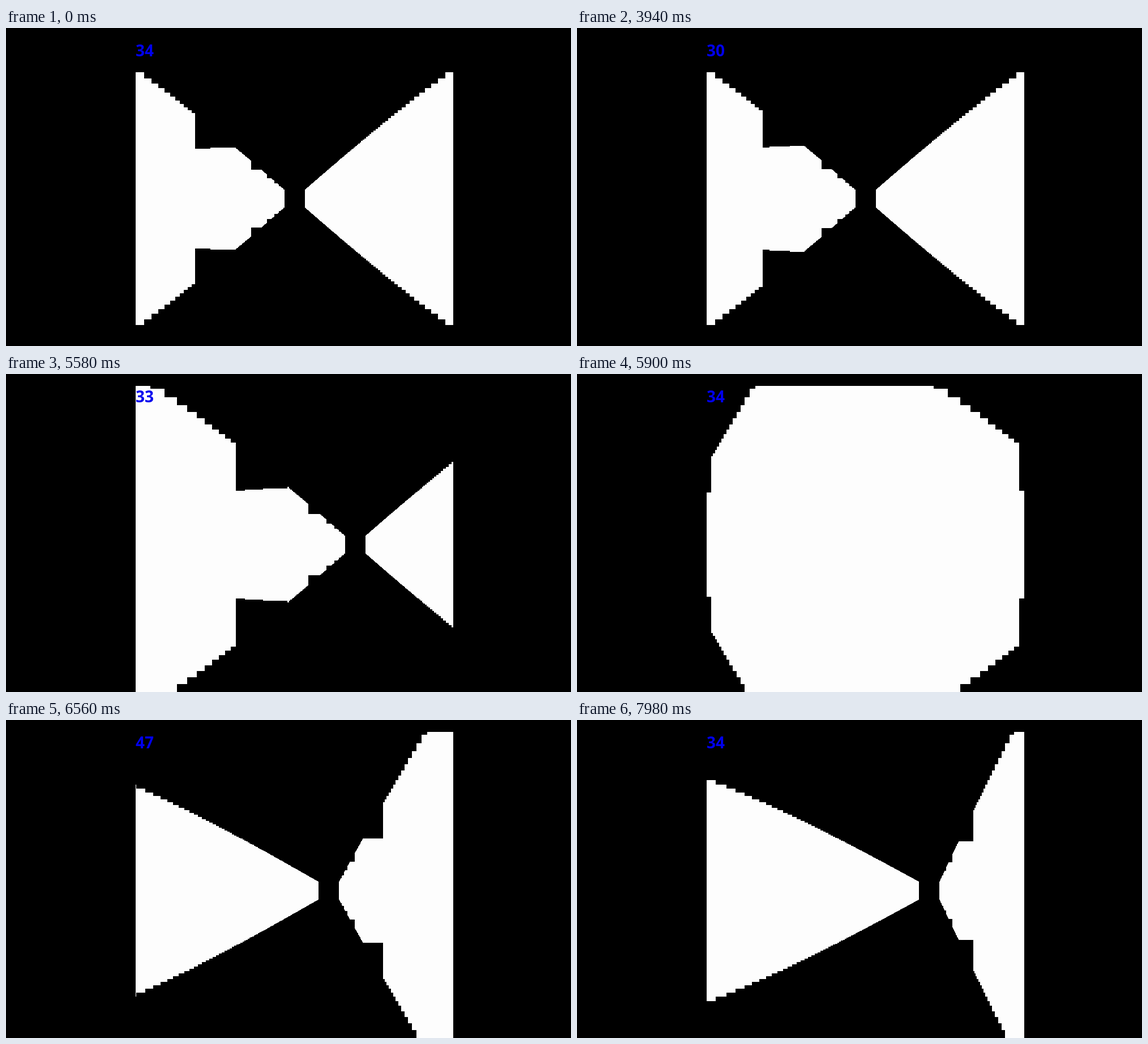
An HTML page with a canvas that plays this animation: 998 by 561 pixels, repeating every 8 s.

```html
<!DOCTYPE html>
<html>
<head>
<meta charset="utf-8">
<style>
  html, body { margin: 0; width: 100%; height: 100%; overflow: hidden; background: #000; }
  canvas { display: block; position: absolute; left: 0; top: 0; }
  #fps {
    position: absolute; left: 229px; top: 20px; line-height: 38px;
    font: bold 28px/38px "Liberation Sans Narrow", "Open Sans", sans-serif;
    font-stretch: 75%; color: #00e;
  }
</style>
</head>
<body>
<canvas id="view" width="998" height="561"></canvas>
<div id="fps">34</div>
<script>
const ctx = document.getElementById('view').getContext('2d');
const label = document.getElementById('fps');
const LOOP = 8000, CELL = 20, REACH = 300;
const LEFT = 229, RIGHT = 790, TOP = 21, MID_X = 510, MID_Y = 301;
const RAY = Math.PI / 3 / (RIGHT - LEFT);
const WALL = 4675, STRIDE = 0.129, TURN = 0.1;

// Step counts over time: [ms, steps]
const forward = [[3340, 0], [4080, 15], [4180, 15], [4920, 30], [5020, 30], [5500, 40]];
const turn = [[5500, 0], [5580, 2], [5760, 7], [5860, 8], [5900, 9], [5980, 9],
  [6400, 21], [6560, 17], [6600, 16], [6700, 17], [6720, 18]];
const back = [[6720, 0], [7440, 16], [7520, 16], [7980, 25]];
const rates = [[0, 34], [820, 33], [1560, 35], [2480, 34], [3360, 30],
  [4200, 31], [5040, 33], [5860, 34], [6540, 47], [7440, 34]];

function steps(keys, t) {
  if (t <= keys[0][0]) return keys[0][1];
  for (let i = 1; i < keys.length; i++) {
    const [t0, v0] = keys[i - 1], [t1, v1] = keys[i];
    if (t < t1) return Math.round(v0 + (v1 - v0) * (t - t0) / (t1 - t0));
  }
  return keys[keys.length - 1][1];
}

// Outer walls on two sides, with a pillar in every second cell
function solid(x, y) {
  const cx = Math.floor(x / CELL + 0.5), cy = Math.floor(y / CELL + 0.5);
  return cx < 0 || cy < 0 || (cx & 1 && cy & 1);
}

function cast(x, y, angle) {
  const dx = Math.sin(angle), dy = Math.cos(angle);
  for (let n = 1; n <= REACH; n++) {
    if (solid(x + dx * n, y + dy * n)) return n;
  }
  return 0;
}

function draw(t) {
  const heading = steps(turn, t) * TURN;
  const retreat = steps(back, t) * STRIDE;
  const x = -Math.sin(heading) * retreat;
  const y = steps(forward, t) * STRIDE - Math.cos(heading) * retreat;

  ctx.fillStyle = '#000';
  ctx.fillRect(0, 0, 998, 561);
  ctx.fillStyle = '#fdfdfd';
  for (let col = LEFT; col < RIGHT; col++) {
    const n = cast(x, y, heading - (col + 0.5 - MID_X) * RAY);
    if (!n) continue;
    const top = Math.max(TOP, Math.round(MID_Y - WALL / n));
    ctx.fillRect(col, top, 1, Math.round(MID_Y + WALL / n) - top);
  }
  label.textContent = rates.filter(r => r[0] <= t).pop()[1];
}

const start = performance.now();
function tick() {
  draw((performance.now() - start) % LOOP);
  requestAnimationFrame(tick);
}
tick();
</script>
</body>
</html>
```
